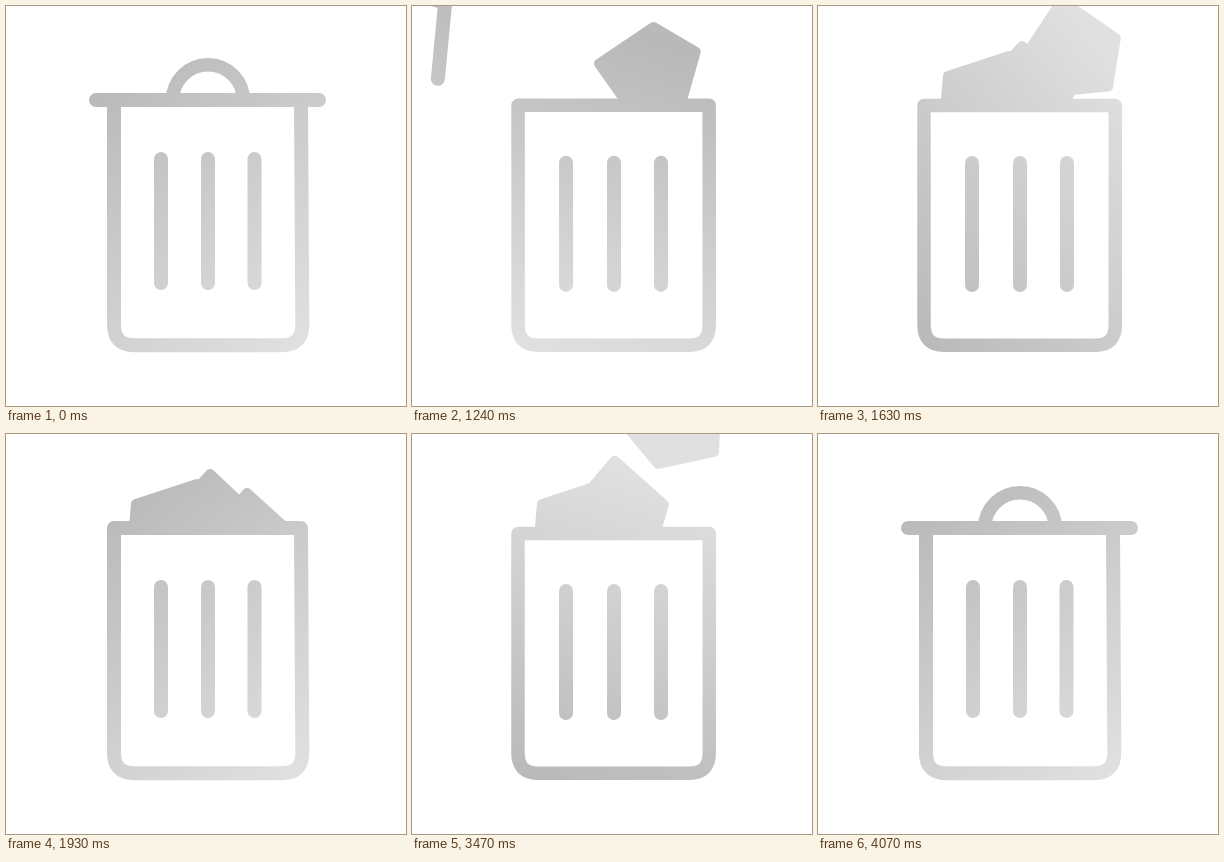
These frames come from a looping animation (400 by 400 pixels, 4.1 s). An HTML page with a canvas:

```html
<!DOCTYPE html>
<html lang="en">
<head>
<meta charset="utf-8">
<title>Trash can</title>
<style>
  html, body { margin: 0; width: 100%; height: 100%; overflow: hidden; background: #fff; }
  canvas { display: block; width: 400px; height: 400px; }
</style>
</head>
<body>
<canvas id="stage" width="400" height="400"></canvas>
<script>
const LOOP = 4100;
const ctx = document.getElementById('stage').getContext('2d');
ctx.lineCap = ctx.lineJoin = 'round';

const clamp = v => Math.min(1, Math.max(0, v));
const span = (t, start, length) => clamp((t - start) / length);
const smooth = u => u * u * (3 - 2 * u);
const mix = (a, b, k) => a + (b - a) * k;
const rad = deg => deg * Math.PI / 180;

// One crumpled sheet, measured from its sharpest corner.
const SHEET = [[0, 0], [19, 63], [-17, 96], [-65, 65], [-61, 20]];

// Resting corner, turn, extra turn and drift while airborne, travel, start times.
const PAPERS = [
  { x: 187, y: 142, turn: -107, spin: 0, drift: 0, rise: 220, enter: 1030, leave: 3590 },
  { x: 241, y: 59, turn: -31, spin: -28, drift: 10, rise: 240, enter: 1390, leave: 3290 },
  { x: 204, y: 40, turn: -30, spin: -28, drift: -24, rise: 242, enter: 1210, leave: 3420, hollowUntil: 1450 },
  { x: 191, y: 50, turn: 0, spin: 0, drift: 0, rise: 200, enter: 1130, leave: 3525 }
];

function line(width, build) {
  ctx.beginPath();
  build();
  ctx.lineWidth = width;
  ctx.stroke();
}

function setPaint(turn) {
  const dx = 165 * Math.cos(rad(turn)), dy = 165 * Math.sin(rad(turn));
  const paint = ctx.createLinearGradient(202 - dx, 200 - dy, 202 + dx, 200 + dy);
  paint.addColorStop(0, '#b9b9b9');
  paint.addColorStop(1, '#e0e0e0');
  ctx.strokeStyle = ctx.fillStyle = paint;
}

function drawPaper(p, t) {
  const away = t < 2500
    ? 1 - smooth(span(t, p.enter, 365))
    : smooth(span(t, p.leave, 360));
  if (away === 1) return;
  const a = rad(p.turn + p.spin * away), c = Math.cos(a), s = Math.sin(a);
  const x0 = p.x + p.drift * away, y0 = p.y - p.rise * away;
  line(10, () => {
    for (const [x, y] of SHEET) ctx.lineTo(x0 + x * c - y * s, y0 + x * s + y * c);
    ctx.closePath();
    if (!(t < p.hollowUntil)) ctx.fill();
  });
}

function drawPapers(t) {
  ctx.save();
  ctx.beginPath();
  ctx.rect(0, 0, 400, 98);
  ctx.clip();
  for (const p of PAPERS) drawPaper(p, t);
  ctx.restore();
}

function drawBin(k) {
  const left = mix(108, 106, k), top = mix(94, 99.5, k);
  const topRight = mix(295, 297.3, k), right = mix(296.3, 297.3, k);
  line(mix(14, 13.5, k), () => {
    ctx.moveTo(left, top);
    ctx.lineTo(topRight, top);
    ctx.lineTo(right, 319);
    ctx.quadraticCurveTo(right, 339.2, right - 20, 339.2);
    ctx.lineTo(left + 20, 339.2);
    ctx.quadraticCurveTo(left, 339.2, left, 319);
    ctx.closePath();
  });
  line(14, () => {
    for (const x of [mix(155, 154, k), 202, mix(248.5, 249, k)]) {
      ctx.moveTo(x, mix(153, 157, k));
      ctx.lineTo(x, mix(277, 279, k));
    }
  });
}

function drawLid(open) {
  if (open === 1) return;
  // Paths are built in the lid's own space but painted with the stage gradient.
  const inLidSpace = build => () => {
    ctx.save();
    ctx.translate(90 - 108 * open ** 1.21, 94 + 26 * open - 90 * open * open);
    ctx.rotate(rad(-130 * open));
    build();
    ctx.restore();
  };
  line(14, inLidSpace(() => {
    ctx.moveTo(0, 0);
    ctx.lineTo(223, 0);
  }));
  line(13.5, inLidSpace(() => ctx.arc(112, 0, 35.3, Math.PI, 2 * Math.PI)));
}

function render(t) {
  const filling = t < 2500;
  const u = filling ? span(t, 1000, 930) : span(t, 3110, 925);
  const turned = 360 * smooth(u);
  const open = filling
    ? span(t, 1000, 330) ** 1.37
    : (1 - span(t, 3650, 400)) ** 2;

  ctx.clearRect(0, 0, 400, 400);
  setPaint(50 + (filling ? turned : 360 - turned));
  drawPapers(t);
  drawBin(smooth(clamp(Math.min(u, 1 - u) / 0.3)));
  drawLid(open);
}

const began = performance.now();
function tick() {
  render((performance.now() - began) % LOOP);
  requestAnimationFrame(tick);
}
tick();
</script>
</body>
</html>
```
